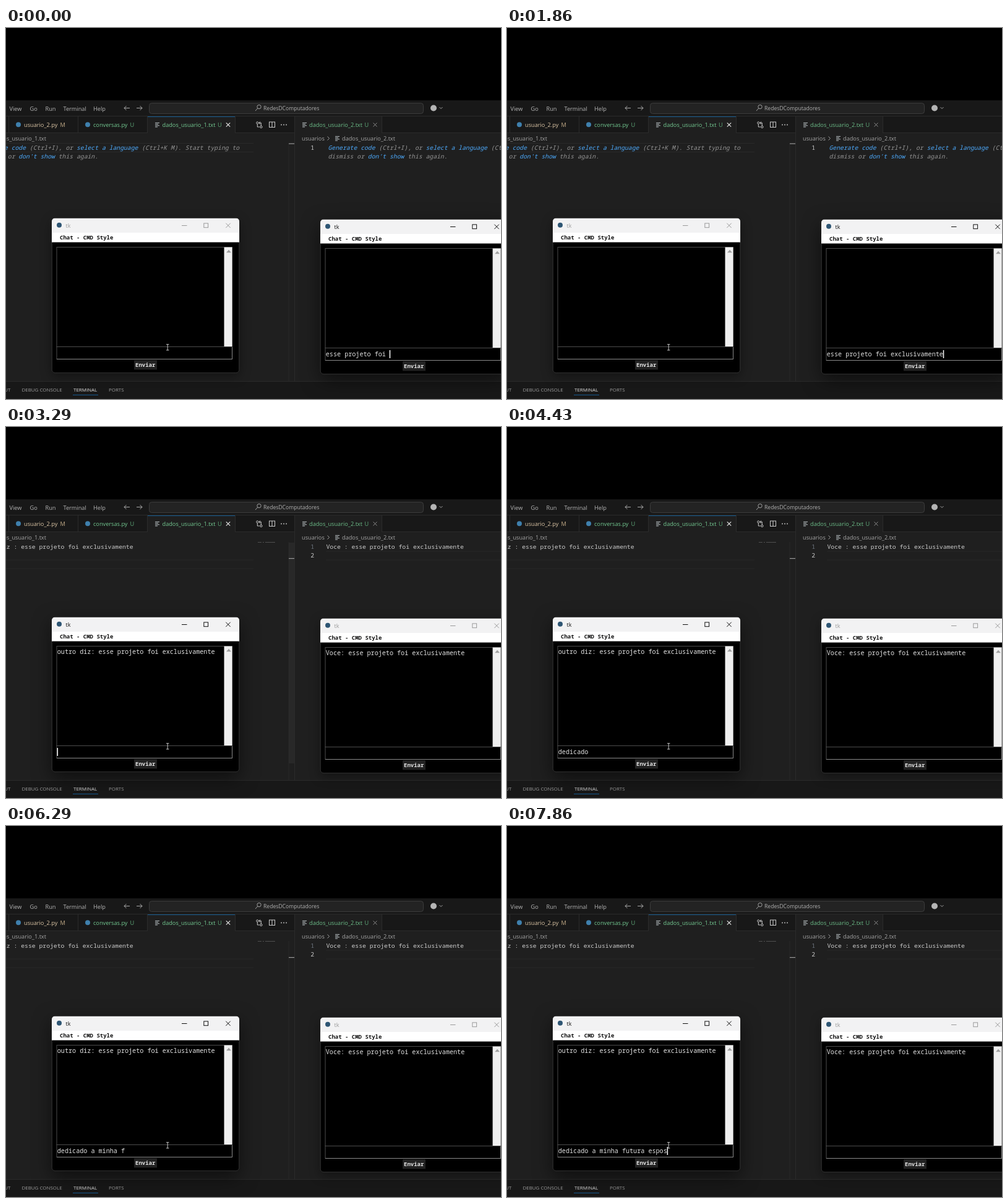
Animation, 800 px wide and 600 px high, one loop 8000 ms. Source, as an HTML page with a canvas:

```html
<!DOCTYPE html>
<html lang="pt">
<head>
<meta charset="utf-8">
<title>Chat</title>
<style>
  html, body { margin: 0; width: 100%; height: 100%; overflow: hidden; background: #000; }
  canvas { display: block; }
</style>
</head>
<body>
<canvas id="stage" width="800" height="600"></canvas>
<script>
const ctx = document.getElementById('stage').getContext('2d');
const LOOP = 8000, FPS = 7;
const UI = '"Open Sans", "Noto Sans", sans-serif';
const MONO = '"Noto Sans Mono", "DejaVu Sans Mono", monospace';
const EDIT = 9.75, CHAT = 10.12, CELL = 0.6;
const GREEN = '#73c991', GREY = '#949494', LINK = '#4daafc', EDGE = '#2b2b2b', ACCENT = '#15598f';
const FIRST = 'esse projeto foi exclusivamente';
const SECOND = 'dedicado a minha futura esposa';

function box(x, y, w, h, color) {
  ctx.fillStyle = color;
  ctx.fillRect(x, y, w, h);
}

function text(str, x, y, color, size = 9.2, family = UI, style = '') {
  ctx.font = `${style} ${size}px ${family}`;
  ctx.fillStyle = color;
  ctx.fillText(str, x, y);
}

function code(str, x, y, color = '#ccc', size = EDIT, style = '') {
  text(str, x, y, color, size, MONO, style + ' 500');
}

function line(color, width, ...pts) {
  ctx.strokeStyle = color;
  ctx.lineWidth = width;
  ctx.beginPath();
  for (let i = 0; i < pts.length; i += 2) ctx.lineTo(pts[i], pts[i + 1]);
  ctx.stroke();
}

function frame(x, y, w, h, color, width = 1) {
  ctx.strokeStyle = color;
  ctx.lineWidth = width;
  ctx.strokeRect(x, y, w, h);
}

function round(x, y, w, h, r) {
  ctx.beginPath();
  ctx.roundRect(x, y, w, h, r);
}

function dot(x, y, r, color) {
  ctx.fillStyle = color;
  ctx.beginPath();
  ctx.arc(x, y, r, 0, Math.PI * 2);
  ctx.fill();
}

function ring(x, y, r, color) {
  ctx.strokeStyle = color;
  ctx.lineWidth = 1;
  ctx.beginPath();
  ctx.arc(x, y, r, 0, Math.PI * 2);
  ctx.stroke();
}

function cross(x, y, r, color, width = 1) {
  line(color, width, x - r, y - r, x + r, y + r);
  line(color, width, x - r, y + r, x + r, y - r);
}

function fileIcon(x, y) {
  [7, 5, 7, 4].forEach((w, i) => box(x, y - 3.6 + i * 2.2, w, 1, '#b8c0c4'));
}

function arrow(x, y, dir) {
  line('#a8a8a8', 1, x - 4.5, y, x + 4.5, y);
  line('#a8a8a8', 1, x + dir, y - 3.5, x + dir * 4.5, y, x + dir, y + 3.5);
}

function titleBar() {
  box(0, 117, 800, 26, '#181818');
  const items = { View: 5.5, Go: 38.5, Run: 63.5, Terminal: 92.5, Help: 141 };
  for (const name in items) text(name, items[name], 133.5, '#b5b5b5');
  arrow(195.5, 129.5, -1);
  arrow(215.5, 129.5, 1);
  round(231.5, 121.5, 443, 17, 4);
  ctx.fillStyle = '#232323';
  ctx.fill();
  ctx.strokeStyle = '#3c3c3c';
  ctx.lineWidth = 1;
  ctx.stroke();
  ring(409, 127.5, 3.2, '#a0a0a0');
  line('#a0a0a0', 1, 406.7, 129.8, 403, 134);
  text('RedesDComputadores', 416, 133, '#b0b0b0', 8.6);
  dot(691, 129.5, 5, '#b4b4b4');
  line('#a0a0a0', 1, 700.5, 128, 703, 130.5, 705.5, 128);
}

function tabs() {
  box(0, 143, 800, 27, '#181818');
  box(0, 142, 800, 1, EDGE);
  box(0, 169, 800, 1, EDGE);
  box(229, 143, 141, 27, '#1f1f1f');
  box(467, 143, 140, 27, '#1f1f1f');
  box(229, 143, 141, 1, ACCENT);
  [4, 116, 228, 370, 607].forEach(x => box(x, 143, 1, 27, EDGE));

  dot(20, 156.3, 4, '#3f80ad');
  text('usuario_2.py', 29, 160, '#dcc6a6');
  text('M', 87.5, 160, '#c5ad89');
  dot(132, 156.3, 4, '#3f80ad');
  text('conversas.py', 141, 160, GREEN);
  text('U', 200.5, 160, '#5eaa7a');
  fileIcon(241, 156.5);
  text('dados_usuario_1.txt', 252.5, 160, GREEN);
  text('U', 342, 160, '#5eaa7a');
  cross(359, 156.5, 3.2, '#e4e4e4', 1.2);

  ring(406.3, 153.5, 1.7, '#ccc');
  ring(412.3, 160, 1.7, '#ccc');
  line('#ccc', 1, 406.3, 155.5, 406.3, 160, 409.5, 160);
  line('#ccc', 1, 412.3, 158, 412.3, 153.5, 409, 153.5);
  line('#ccc', 1, 411, 151.3, 408.8, 153.5, 411, 155.7);
  frame(425.5, 152, 9, 8.5, '#ccc');
  line('#ccc', 1, 430, 152, 430, 160.5);
  [445, 449, 453].forEach(x => dot(x, 156.5, 0.9, '#ccc'));

  fileIcon(479, 156.5);
  text('dados_usuario_2.txt', 490, 160, '#6cbd88');
  text('U', 579.5, 160, '#5eaa7a');
  cross(596.5, 156.5, 3, '#8f8f8f');
}

function hint(x) {
  const parts = [
    ['Generate code', 0, 0, LINK], ['(Ctrl+I), or', 14, 0, GREY],
    ['select a language', 27, 0, LINK], ['(Ctrl+K M). Start typing to', 45, 0, GREY],
    ['dismiss or', 0, 1, GREY], ["don't show", 11, 1, LINK], ['this again.', 22, 1, GREY]
  ];
  for (const [str, col, row, color] of parts)
    code(str, x + col * EDIT * CELL, 196.5 + row * 14.4, color, EDIT, 'italic');
}

function currentLine(x, y, w) {
  box(x, y, w, 1, '#292929');
  box(x, y + 14, w, 1, '#292929');
}

function editors(saved, slider) {
  box(0, 170, 800, 401, '#1f1f1f');
  ctx.save();
  ctx.beginPath();
  ctx.rect(0, 170, 466, 401);
  ctx.clip();
  text('dados_usuario_1.txt', -21, 182, '#a5a5a5');
  currentLine(0, saved ? 214.5 : 186, 400);
  if (saved) {
    code('outro diz : ' + FIRST, -46, 196.5);
    for (let x = 407; x < 434; x += 2) if (x !== 413 && x !== 417) box(x, 186, 1.6, 1, '#5c5c5c');
  } else {
    hint(-44);
  }
  box(456.5, 186, 1, 385, '#292929');
  if (slider) box(457, 187, 9, 357, `rgba(121,121,121,${0.1 * slider})`);
  box(457, saved ? 212 : 186.5, 9, 1.2, '#999');
  ctx.restore();

  text('usuarios', 478, 182, '#a5a5a5');
  line('#a0a0a0', 1, 519.5, 175.5, 522.5, 178.5, 519.5, 181.5);
  fileIcon(532, 178.5);
  text('dados_usuario_2.txt', 543, 182, '#a5a5a5');
  code('1', 492.3, 196.5, saved ? '#6e7681' : '#ccc');
  if (saved) {
    currentLine(517, 200.5, 283);
    code('2', 492.3, 211);
    code('Voce : ' + FIRST, 517.5, 196.5);
  } else {
    hint(520.5);
  }
}

function panel() {
  box(0, 571, 800, 29, '#181818');
  box(0, 571, 800, 1, EDGE);
  ctx.textAlign = 'right';
  text('OUTPUT', 7.5, 588, '#9d9d9d', 7.95);
  ctx.textAlign = 'left';
  text('DEBUG CONSOLE', 25.5, 588, '#9d9d9d', 7.95);
  text('TERMINAL', 109, 588, '#e0e0e0', 7.95);
  text('PORTS', 166, 588, '#9d9d9d', 7.95);
  box(108, 593, 41, 1, ACCENT);
}

function chatWindow(x, y, { active, log, entry, caret }) {
  const ink = active ? '#111' : '#9a9a9a';
  ctx.save();
  ctx.translate(x, y);

  ctx.save();
  ctx.shadowColor = `rgba(0,0,0,${active ? 0.55 : 0.4})`;
  ctx.shadowBlur = active ? 30 : 18;
  ctx.shadowOffsetY = active ? 9 : 5;
  ctx.fillStyle = '#000';
  round(0, -0.5, 303, 250.5, 5);
  ctx.fill();
  ctx.restore();

  round(0.25, 0, 302.5, 249.7, 5);
  ctx.strokeStyle = '#4a4a4a';
  ctx.lineWidth = 0.7;
  ctx.stroke();
  ctx.save();
  round(0, -0.5, 303, 250.5, 5);
  ctx.clip();
  box(0, -0.5, 303, 24, '#f2f2f3');
  box(0, 23, 303, 15.5, '#fff');
  ctx.restore();

  dot(12, 10.8, 4, '#2d5573');
  text('tk', 22.5, 14.5, ink, 9);
  line(ink, 1, 210, 11.5, 218.5, 11.5);
  frame(245.8, 7.9, 6.8, 6.8, ink);
  cross(285, 11.4, 3.7, ink);
  text('Chat - CMD Style', 13, 34, '#111', 9, MONO, 'bold');

  frame(8, 46.5, 283.5, 161, '#4c4c4c');
  box(278.5, 46.5, 13, 161, '#f0f0f0');
  ctx.fillStyle = '#a0a0a0';
  ctx.beginPath();
  ctx.moveTo(282, 55.2);
  ctx.lineTo(286, 50.7);
  ctx.lineTo(290, 55.2);
  ctx.fill();
  frame(8, 207.5, 283.5, 20, '#4c4c4c');
  line('#8a8a8a', 1, 8, 227.5, 291.5, 227.5, 291.5, 208);

  code(log, 8.8, 58.6, '#e2e2e2', CHAT);
  code(entry, 8.8, 220.5, '#e2e2e2', CHAT);
  if (caret) box(8.5 + entry.length * CHAT * CELL, 211, 1.5, 13, '#fff');

  box(133, 229, 37, 15.5, '#222');
  text('Enviar', 135, 239.8, '#e4e4e4', 9, MONO, '600');
  ctx.restore();
}

function pointer() {
  line('#c4c4c4', 1, 261.2, 512, 261.2, 521);
  line('#c4c4c4', 1, 259, 511.7, 263.4, 511.7);
  line('#c4c4c4', 1, 259, 521, 263.4, 521);
}

// Letters typed: [step, count] knots, straight between them.
function typed(step, knots) {
  let count = knots[0][1];
  for (let i = 1; i < knots.length; i++) {
    const [a, from] = knots[i - 1], [b, to] = knots[i];
    if (step >= a) count = from + (to - from) * Math.min(1, (step - a) / (b - a));
  }
  return Math.round(count);
}

const RIGHT = [[0, 17], [2, 19], [3, 19], [10, 26], [12, 30], [13, 31]];
const LEFT = [[26, 0], [30, 7], [31, 8], [33, 11], [36, 11], [43, 18], [44, 18], [55, 29]];

function draw(time) {
  const step = Math.floor(time * FPS / 1000 + 0.05);
  const now = step * 1000 / FPS;
  const sent = step >= 14, saved = step >= 15, swapped = step >= 20;
  const slider = step === 23 ? 1 : step === 24 ? 0.5 : 0;

  box(0, 0, 800, 600, '#000');
  titleBar();
  editors(saved, slider);
  tabs();
  box(466, 143, 1, 428, EDGE);
  panel();

  chatWindow(74, 308, {
    active: swapped,
    log: sent ? 'outro diz: ' + FIRST : '',
    entry: SECOND.slice(0, typed(step, LEFT)),
    caret: step > 20 && (now - 2900) % 900 < 600
  });
  chatWindow(508, 310, {
    active: !swapped,
    log: sent ? 'Voce: ' + FIRST : '',
    entry: sent ? '' : FIRST.slice(0, typed(step, RIGHT)),
    caret: !swapped && (now + 350) % 900 < 600
  });
  pointer();
}

const start = performance.now();
function tick() {
  draw((performance.now() - start) % LOOP);
  requestAnimationFrame(tick);
}
tick();
</script>
</body>
</html>
```
